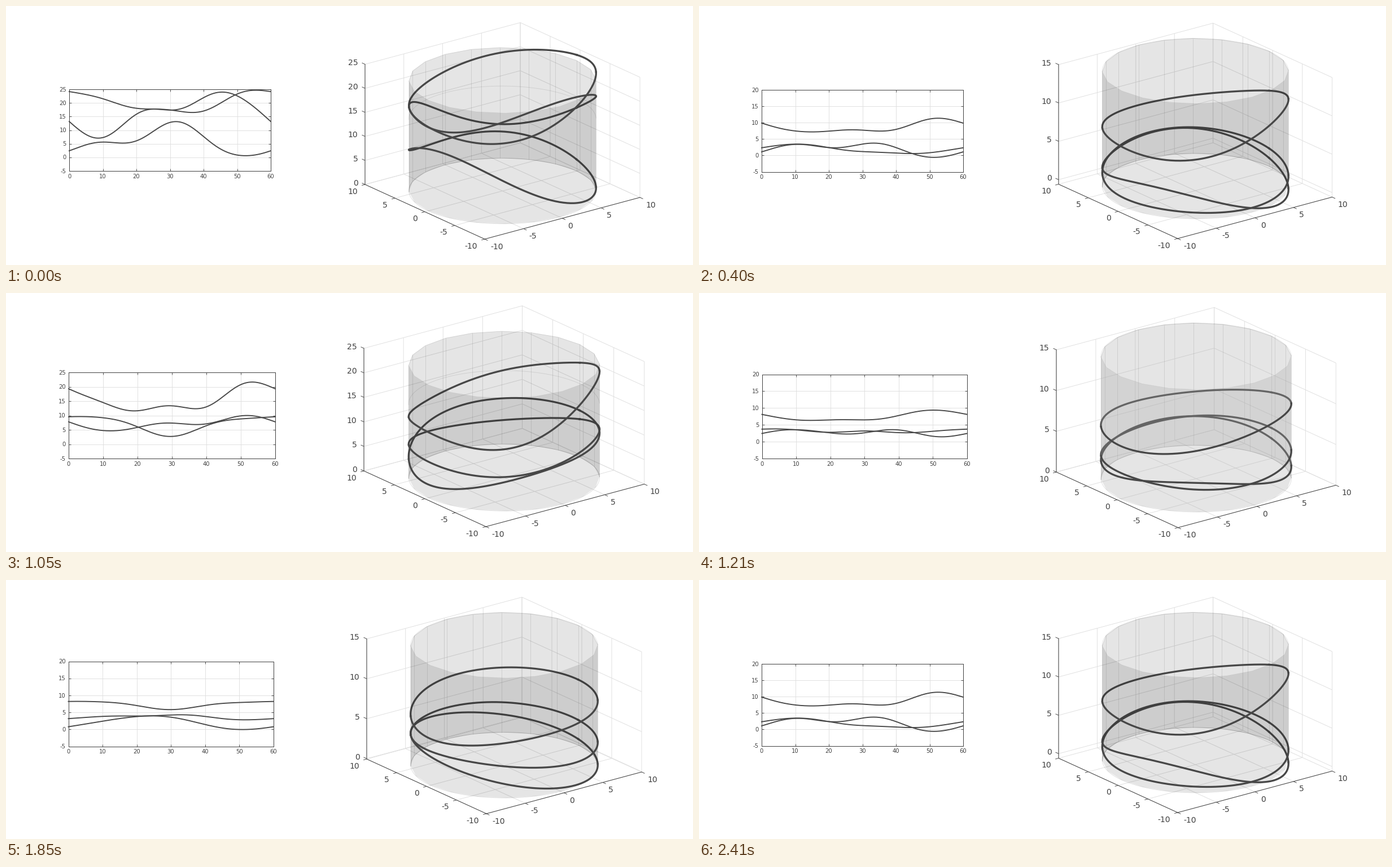
Animation, 1217 px wide and 460 px high, one loop 2810 ms. Source, as a matplotlib script:

```python
import numpy as np
import matplotlib.pyplot as plt
from matplotlib.animation import FuncAnimation
from matplotlib.collections import LineCollection

W, H, DPI = 1217, 460, 64
PX = 72 / DPI               # points per pixel
R = 60 / (2 * np.pi)        # cylinder with a circumference of 60
INK, CURVE, GRID = "0.25", "0.28", "0.87"

plt.rcParams["font.family"] = "DejaVu Sans"
fig = plt.figure(figsize=(W / DPI, H / DPI), dpi=DPI, facecolor="white")
ax = fig.add_axes([0, 0, 1, 1])
ax.set(xlim=(0, W), ylim=(H, 0))
ax.axis("off")

T = np.linspace(0, 60, 361)
PHI = T / R
BACK = np.radians(np.arange(-36, 145, 18))
FRONT = BACK + np.pi
ARC = np.linspace(BACK[0], BACK[-1], 90)


def wave(level, *harmonics):
    """Level plus a few harmonics, each a complex amplitude."""
    return level + sum((c * np.exp(-1j * k * PHI)).real
                       for k, c in enumerate(harmonics, 1))


def unit(d):
    return d / np.hypot(*d)


class Slide:
    def __init__(self, box, origin, scale, waves, tall=False,
                 xlim=(0, 60), ylim=None, face=("0", 0.1)):
        self.parts = []
        self.waves = waves
        self.chart(box, xlim, ylim or (-5, 25 if tall else 20))

        self.p = np.array(origin)
        self.x_axis, self.y_axis = scale * np.array([(275, -74), (-212, -97)])
        self.rise = scale * 213.5
        self.zlim = min(0, np.min(waves)), 25 if tall else 15
        self.box3d()
        self.cylinder(23 if tall else 15, *face)

    def segs(self, lines, color, width, z, alpha=1):
        self.parts.append(ax.add_collection(LineCollection(
            lines, colors=color, linewidths=width * PX, zorder=z, alpha=alpha)))

    def path(self, pts, color, width, z, alpha=1):
        self.parts += ax.plot(*np.transpose(pts), color=color, lw=width * PX,
                              zorder=z, alpha=alpha, solid_joinstyle="round")

    def label(self, x, y, value, size, ha):
        self.parts.append(ax.text(x, y + 0.365 * size, f"{value:d}", ha=ha,
                                  va="baseline", size=size * PX, color=INK))

    def chart(self, box, xlim, ylim):
        l, t, r, b = box
        fx = lambda v: l + (v - xlim[0]) / (xlim[1] - xlim[0]) * (r - l)
        fy = lambda v: b - (v - ylim[0]) / (ylim[1] - ylim[0]) * (b - t)
        grid, ticks = [], []
        for v in range(0, 61, 10):
            if xlim[0] <= v <= xlim[1]:
                x = fx(v)
                grid.append([(x, t), (x, b)])
                ticks += [[(x, b), (x, b - 4)], [(x, t), (x, t + 4)]]
                self.label(x, b + 9, v, 10, "center")
        for v in range(-5, 26, 5):
            if ylim[0] <= v <= ylim[1]:
                y = fy(v)
                grid.append([(l, y), (r, y)])
                ticks += [[(l, y), (l + 4, y)], [(r, y), (r - 4, y)]]
                self.label(l - 5, y, v, 10, "right")
        self.segs(grid, GRID, 0.9, 1)
        self.segs(ticks, INK, 0.9, 2)
        self.path([(l, t), (r, t), (r, b), (l, b), (l, t)], INK, 1, 2)
        seen = (T >= xlim[0]) & (T <= xlim[1])
        for w in self.waves:
            self.path(np.c_[fx(T[seen]), fy(w[seen])], CURVE, 1.9, 3)

    def proj(self, x, y, z):
        """Parallel projection of data coordinates to stage pixels."""
        a, b, z = np.broadcast_arrays((x + 10) / 20, (y - 10) / 20, z)
        z0, z1 = self.zlim
        pts = self.p + a[..., None] * self.x_axis + b[..., None] * self.y_axis
        pts[..., 1] -= (z - z0) / (z1 - z0) * self.rise
        return pts

    def box3d(self):
        P = self.proj
        z0, z1 = self.zlim
        left, right = -unit(self.x_axis), -unit(self.y_axis)
        grid, ticks = [], []
        for v in range(-10, 11, 5):
            a, b = P(v, -10, z0), P(-10, v, z0)
            grid += [[a, P(v, 10, z0), P(v, 10, z1)],
                     [b, P(10, v, z0), P(10, v, z1)]]
            ticks += [[a, a + 6 * right], [b, b + 6 * left]]
            self.label(a[0] + 10, a[1] + 12.5, v, 14, "left")
            self.label(b[0] - 13, b[1] + 11.5, v, 14, "right")
        for v in range(0, z1 + 1, 5):
            a = P(-10, 10, v)
            grid.append([a, P(10, 10, v), P(10, -10, v)])
            ticks.append([a, a - 6 * right])
            self.label(a[0] - 12.5, a[1] - 3.5, v, 14, "right")
        self.segs(grid, GRID, 0.9, 1)
        self.segs(ticks, INK, 0.9, 2)
        self.path([P(-10, 10, z1), P(-10, 10, z0), P(-10, -10, z0),
                   P(10, -10, z0)], INK, 1, 2)

    def ring(self, phi, z):
        return self.proj(R * np.cos(phi), R * np.sin(phi), z)

    def wall(self, phi, height, color, alpha, z):
        pts = np.r_[self.ring(phi, 0), self.ring(phi, height)[::-1]]
        self.parts += ax.fill(*pts.T, fc=color, ec="none", alpha=alpha, zorder=z)

    def cylinder(self, height, color, alpha):
        self.wall(BACK, height, color, alpha, 3)
        self.segs([self.ring(f, np.array([0, height])) for f in BACK],
                  "0", 0.9, 3.1, 0.11)
        self.path(self.ring(BACK, height), "0", 0.9, 3.1, 0.13)
        self.path(self.ring(ARC, 15), "0", 0.9, 3.1, 0.1)
        self.path(self.ring(ARC, 0), "0", 0.9, 3.1, 0.2)

        self.wall(FRONT, height, color, alpha, 5)
        self.path(self.ring(FRONT, height), "0", 0.8, 5.1, 0.05)
        self.path(self.ring(ARC + np.pi, 0), "0", 0.9, 5.1, 0.13)

        near = (PHI > BACK[-1]) & (PHI < BACK[0] + 2 * np.pi)
        for w in self.waves:
            pts = self.ring(PHI, w)
            for side, z in ((~near, 4), (near, 6)):
                joined = side | np.roll(side, 1)
                self.path(np.where(joined[:, None], pts, np.nan), CURVE, 3.3, z)

    def show(self, on):
        for part in self.parts:
            part.set_visible(on)


slides = [
    Slide((112, 148, 469, 293), (636, 317), 1, tall=True, waves=[
        wave(20.25, 3.87 - .21j, .55 - .79j, -.5),
        wave(16.37, -2.72 - 6.18j, -1.09 - 2.67j, .62 + .33j),
        wave(5.91, -4.68 + .92j, 1.72 + 1.83j, -.53 - .16j)]),
    Slide((111, 149, 468, 294.5), (637, 316.5), 0.995, waves=[
        wave(8.59, 1.25 - 1.21j, .2 - .9j, -.18),
        wave(1.82, .58 + 1.24j, -.06 + .28j, -.07j),
        wave(2.03, -1.12 + 1.13j, .25 + 1.13j, -.07 - .13j)]),
    Slide((111, 141, 477, 294), (634, 316), 1.02, tall=True, waves=[
        wave(15.42, 3.74 - 2.2j, .9 - 1.41j, -.78),
        wave(7.12, 3.2, -1 + .23j, .22),
        wave(7.11, .42 - 1.83j, .45 - 1.12j, -.21)]),
    Slide((111.5, 144.5, 475, 294), (633, 318), 1.017, face=("0.667", 0.3), waves=[
        wave(7.45, .81 - 1.21j, -.16 - .46j, .07j),
        wave(3.17, .37 + .15j, .29 + .09j, -.1),
        wave(2.73, -.22 + .31j, -.18 + .82j, .12)]),
    Slide((110.5, 144.5, 473.5, 295.5), (639, 318), 1, waves=[
        wave(7.34, 1.12 + .04j, -.33 + .06j, .08),
        wave(3.63, -.54 + .32j, .07 + .25j, -.06j),
        wave(1.99, -1.41 + 1.38j, .19 + .04j)]),
    Slide((110, 146, 470, 295.5), (639.5, 317.5), 0.995,
          xlim=(2.98, 57.4), ylim=(-3.8, 18.86), waves=[
        wave(6.06, .33 - .09j, .15 + .06j, -.08),
        wave(3.07, .65 - .85j, .2 - .16j, -.12),
        wave(1.78, -1.47 + .89j, .36 + .54j, -.08j)]),
]
slides.append(slides[1])
CUTS = [40, 80, 121, 161, 201, 241]     # in steps of 10 ms


def update(i):
    current = slides[np.searchsorted(CUTS, i, side="right")]
    for s in slides:
        s.show(False)
    current.show(True)
    return current.parts


anim = FuncAnimation(fig, update, frames=281, interval=10, repeat=True,
                     repeat_delay=0, init_func=lambda: update(0), blit=False)
plt.show()
```
